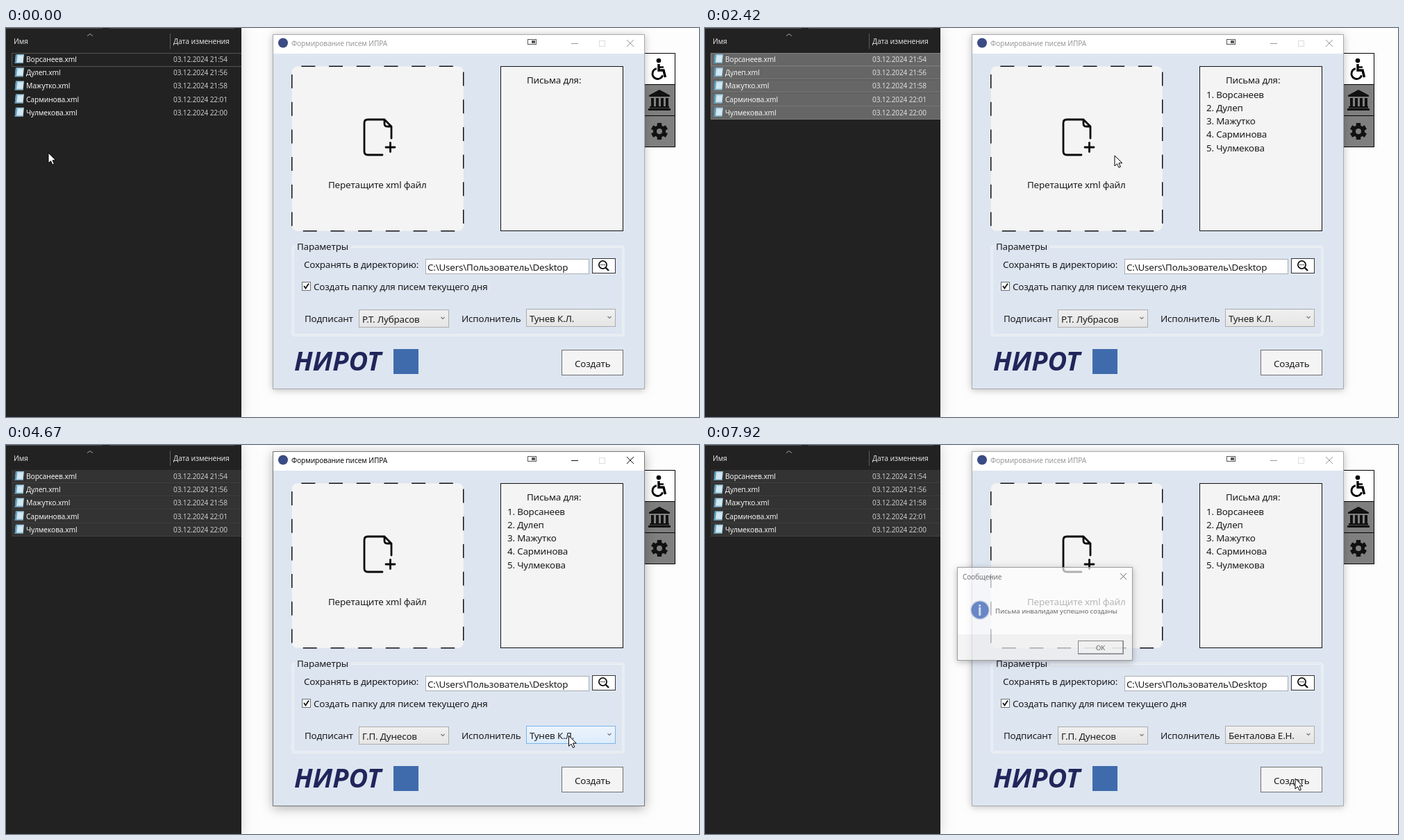
An HTML page with a canvas that plays this animation: 998 px wide and 561 px high, repeating every 8 s.

```html
<!DOCTYPE html>
<html lang="ru">
<head>
<meta charset="utf-8">
<style>
html, body { margin: 0; width: 100%; height: 100%; overflow: hidden; background: #fdfdfd; }
canvas { display: block; }
</style>
</head>
<body>
<canvas id="stage" width="998" height="561"></canvas>
<script>
const ctx = document.getElementById('stage').getContext('2d');
const LOOP = 8000;
const UI = '"Noto Sans", "Open Sans", sans-serif';
const PEOPLE = ['Ворсанеев', 'Дулеп', 'Мажутко', 'Сарминова', 'Чулмекова'];
const TIMES = ['21:54', '21:56', '21:58', '22:01', '22:00'];
const SIGNERS = ['Р.Т. Лубрасов', 'Г.П. Дунесов'];
const AUTHORS = ['Тунев К.Л.', 'Бенталова Е.Н.'];

// Moments of the interaction, in ms
const AT = {
  band: 80, bandEnd: 830, drag: 920, drop: 1920, listed: 2170, focus: 3200,
  signerOpen: 3280, signerPick: 4040, signerSet: 4160,
  authorOpen: 4780, authorPick: 5500, authorSet: 5570,
  press: 6830, release: 6990, modal: 7740
};
// Cursor stops: time, x, y
const PATH = [
  [80, 61, 180], [830, 152, 43], [920, 154, 44], [1330, 306, 71], [1670, 560, 168],
  [1920, 590, 184], [2420, 590, 184], [2920, 585, 330], [3200, 574, 420],
  [3330, 574, 421], [3750, 572, 470], [4080, 572, 470], [4700, 812, 419],
  [4920, 814, 424], [5250, 814, 470], [5750, 815, 470], [6330, 850, 481]
];

const clamp = v => Math.max(0, Math.min(1, v));
const within = (t, a, b) => t >= a && t < b;

function cursorAt(t) {
  const i = PATH.findIndex(p => p[0] > t);
  if (i === 0) return PATH[0].slice(1);
  if (i < 0) return PATH[PATH.length - 1].slice(1);
  const [t0, x0, y0] = PATH[i - 1], [t1, x1, y1] = PATH[i];
  const k = (t - t0) / (t1 - t0), e = k * k * (3 - 2 * k);
  return [x0 + (x1 - x0) * e, y0 + (y1 - y0) * e];
}

function fill(x, y, w, h, color) {
  ctx.fillStyle = color;
  ctx.fillRect(x, y, w, h);
}

function frame(x, y, w, h, color, width = 1) {
  ctx.strokeStyle = color;
  ctx.lineWidth = width;
  ctx.strokeRect(x + .5, y + .5, w - 1, h - 1);
}

function box(x, y, w, h, color, border) {
  fill(x, y, w, h, color);
  frame(x, y, w, h, border);
}

function line(points, color, width = 1) {
  ctx.strokeStyle = color;
  ctx.lineWidth = width;
  ctx.beginPath();
  points.forEach(p => ctx.lineTo(...p));
  ctx.stroke();
}

function disc(x, y, r, color) {
  ctx.fillStyle = color;
  ctx.beginPath();
  ctx.arc(x, y, r, 0, 7);
  ctx.fill();
}

function label(str, x, y, color = '#1b1b1b', size = 13.4, style = '') {
  ctx.font = `${style} ${size}px ${UI}`;
  ctx.letterSpacing = style ? '0px' : `${-size * .014}px`;
  ctx.fillStyle = color;
  ctx.fillText(str, x, y);
}

// Casts a shadow only outside the rectangle, so translucent panels stay clean
function shadow(x, y, w, h, blur, alpha, dy) {
  ctx.save();
  ctx.beginPath();
  ctx.rect(0, 0, 998, 561);
  ctx.rect(x, y, w, h);
  ctx.clip('evenodd');
  ctx.shadowColor = `rgba(0,0,0,${alpha})`;
  ctx.shadowBlur = blur;
  ctx.shadowOffsetY = dy;
  fill(x, y, w, h, '#000');
  ctx.restore();
}

function at(x, y, draw) {
  ctx.save();
  ctx.translate(x, y);
  draw();
  ctx.restore();
}

function fileIcon(x, y) {
  at(x, y, () => {
    ctx.transform(1, 0, -.1, 1, 2, 0);
    fill(0, 0, 12, 13, '#a5cfe2');
    fill(3, 2, 8, 9, '#d3e8f1');
    fill(0, 0, 2, 13, '#5897b8');
    fill(0, 12, 12, 1, '#6b95a9');
  });
}

function explorer(t, cx, cy) {
  shadow(0, 0, 339, 561, 16, .16, 0);
  fill(0, 0, 339, 561, '#222');
  fill(0, 0, 139, 1, '#4a4a4a');
  fill(149, 0, 180, 1, '#4a4a4a');
  fill(236, 8, 1, 22, '#5c5c5c');
  line([[117, 11.5], [121, 8.5], [125, 11.5]], '#a8a8a8');
  label('Имя', 11, 23, '#dedede', 10.2);
  label('Дата изменения', 241, 23, '#dedede', 10.3);

  const active = t < AT.focus;
  PEOPLE.forEach((name, i) => {
    const y = 36 + i * 19.2;
    const selected = t >= AT.bandEnd || (t > AT.band && cy < y + 19);
    if (selected) {
      fill(8, y, 331, 19.2, active ? '#666' : '#333');
      fill(8, Math.round(y + 18), 331, 1, active ? '#7b7b7b' : '#404040');
    }
    if (!i && (!selected || active)) {
      line([[339, 36.5], [8.5, 36.5], [8.5, 55.5], [339, 55.5]], selected ? '#858585' : '#555');
    }
    fileIcon(12, y + 2);
    label(name + '.xml', 29, y + 13, '#f2f2f2', 10.3);
    label('03.12.2024 ' + TIMES[i], 241, y + 13, active && selected ? '#ddd' : '#c9c9c9', 10.1);
  });

  if (within(t, AT.band, AT.bandEnd)) {
    const [, x, y] = PATH[0];
    fill(x, y, cx - x, cy - y, 'rgba(0,120,215,.3)');
    ctx.strokeStyle = '#0078d7';
    ctx.lineWidth = 1;
    ctx.strokeRect(x, y, cx - x, cy - y);
  }
}

function tabs() {
  ['#fff', '#7f7f7f', '#7f7f7f'].forEach((c, i) => box(919, 36 + i * 45, 45, 46, c, '#000'));
  // Wheelchair
  disc(940, 47, 3.3, '#000');
  line([[940, 52], [940, 61], [947, 61], [949.5, 71]], '#000', 3.4);
  line([[940, 56.5], [947, 56.5]], '#000', 2.4);
  ctx.lineWidth = 2.8;
  ctx.beginPath();
  ctx.arc(938.5, 66, 7.5, .3, 4.5);
  ctx.stroke();
  // Building with columns
  ctx.fillStyle = '#111';
  ctx.beginPath();
  [[926, 97], [941, 89], [956, 97], [956, 99], [926, 99]].forEach(p => ctx.lineTo(...p));
  ctx.fill();
  [929, 936, 943, 950].forEach(x => fill(x, 101, 4, 12, '#111'));
  fill(927, 113, 28, 2.5, '#111');
  fill(925, 116, 32, 3, '#111');
  // Gear
  at(941, 149, () => {
    for (let i = 0; i < 6; i++) {
      ctx.rotate(Math.PI / 3);
      fill(-3.2, -12, 6.4, 8, '#111');
    }
    disc(0, 0, 9, '#111');
    disc(0, 0, 4, '#7f7f7f');
  });
}

function titleBar(active) {
  const ink = active ? '#111' : '#999';
  fill(384, 9, 536, 28, '#fff');
  disc(399, 21.5, 7, '#3b4b83');
  label('Формирование писем ИПРА', 411, 26, ink, 10.2);
  frame(751, 16, 13, 8, '#555');
  fill(757, 18, 5, 4, '#555');
  line([[814, 22.5], [824, 22.5]], ink);
  frame(854, 18, 9, 9, '#ddd');
  line([[894, 17], [904, 27]], ink);
  line([[904, 17], [894, 27]], ink);
}

function dropZone() {
  ctx.fillStyle = '#f4f4f4';
  ctx.strokeStyle = '#111';
  ctx.lineWidth = 1.5;
  ctx.beginPath();
  ctx.roundRect(411.75, 55.25, 247, 237.5, 8);
  ctx.fill();
  ctx.setLineDash([20, 19.7]);
  ctx.lineDashOffset = -5.6;
  ctx.stroke();
  ctx.setLineDash([]);

  ctx.lineCap = ctx.lineJoin = 'round';
  ctx.lineWidth = 2.8;
  ctx.strokeStyle = '#0a0a0a';
  ctx.stroke(new Path2D('M542 183H521Q516 183 516 178V137Q516 132 521 132H545L555 142V159M545 132V138Q545 142 549 142H555'));
  line([[547, 172], [560, 172]], '#0a0a0a', 2.8);
  line([[553.5, 165.5], [553.5, 178.5]], '#0a0a0a', 2.8);
  ctx.lineCap = 'butt';
  ctx.lineJoin = 'miter';
  label('Перетащите xml файл', 464, 231);
}

function recipients(t) {
  box(712, 55, 177, 238, '#f4f4f4', '#111');
  label('Письма для:', 750, 80);
  if (t >= AT.listed) PEOPLE.forEach((name, i) => label(`${i + 1}. ${name}`, 722, 100.5 + i * 19.3));
}

function combo(x, y, w, h, value, hot) {
  const shade = ctx.createLinearGradient(0, y, 0, y + h);
  shade.addColorStop(0, hot ? '#ecf4fc' : '#f0f0f0');
  shade.addColorStop(1, hot ? '#dcecfc' : '#e5e5e5');
  box(x, y, w, h, shade, hot ? '#7eb4ea' : '#acacac');
  label(value, x + 5, y + 19);
  line([[x + w - 11.5, y + 11], [x + w - 9, y + 13.5], [x + w - 6.5, y + 11]], '#777', 1.2);
}

function dropdown(x, y, w, items, cy) {
  shadow(x, y, w, 49, 5, .45, 2);
  box(x, y, w, 49, '#fff', '#777');
  items.forEach((item, i) => {
    const top = y + 1 + i * 23.5;
    if (cy >= top && cy < top + 24) box(x + 1, Math.round(top), w - 2, 24, '#b4e0f3', '#26a0da');
    label(item, x + 5, top + 17);
  });
}

function settings(t, cx, cy) {
  ctx.lineWidth = 3;
  ctx.strokeStyle = '#f7f9fc';
  ctx.beginPath();
  ctx.roundRect(413, 315.5, 476, 127.5, 3);
  ctx.stroke();
  ctx.lineWidth = 1;
  ctx.strokeStyle = '#d5dfe5';
  ctx.stroke();
  fill(417, 307, 80, 14, '#dde5f1');
  label('Параметры', 419, 319.5);

  label('Сохранять в директорию:', 429, 346);
  box(604, 333, 236, 22, '#fff', '#abadb3');
  label('C:\\Users\\Пользователь\\Desktop', 607, 350);
  box(844, 332, 34, 22, '#fff', '#333');
  ctx.lineWidth = 1.8;
  ctx.strokeStyle = '#111';
  ctx.beginPath();
  ctx.arc(859.5, 341.5, 5.6, 0, 7);
  ctx.stroke();
  line([[863.5, 345.5], [868, 350]], '#111', 2.4);
  [857, 859.5, 862].forEach(x => disc(x, 341.5, .8, '#111'));

  box(426, 366, 13, 13, '#fff', '#707070');
  line([[429, 372], [431.5, 375.5], [436, 368.5]], '#111', 1.8);
  label('Создать папку для писем текущего дня', 443, 378);

  const over = (x, y, w, h) => within(t, AT.focus - 200, AT.modal) &&
    cx > x && cx < x + w && cy > y && cy < y + h;
  label('Подписант', 430, 424);
  combo(508, 406, 130, 26, SIGNERS[+(t >= AT.signerSet)], over(508, 406, 130, 26));
  label('Исполнитель', 656, 424);
  combo(749, 405, 129, 26, AUTHORS[+(t >= AT.authorSet)], over(749, 405, 129, 26));
}

function createButton(t, cx, cy) {
  const over = cx > 800 && cx < 889 && cy > 464 && cy < 501;
  let colors = ['#f4f4f4', '#707070'];
  if (over && within(t, 5700, AT.modal)) colors = ['#bee6fd', '#3c7fb1'];
  if (within(t, AT.press, AT.release)) colors = ['#c4e5f6', '#2c628b'];
  box(800, 464, 89, 37, ...colors);
  label('Создать', 819, 489);
}

function appWindow(t, cx, cy) {
  const active = within(t, AT.focus, AT.modal);
  shadow(384, 9, 536, 512, active ? 15 : 10, active ? .3 : .25, active ? 3 : 1);
  fill(384, 9, 536, 512, '#dde5f1');
  titleBar(active);
  dropZone();
  recipients(t);
  settings(t, cx, cy);
  label('НИРОТ', 415, 494, '#20265a', 38, 'italic bold');
  fill(558, 463, 36, 36, '#3f6bad');
  createButton(t, cx, cy);
  frame(384, 9, 536, 512, active ? '#777' : '#aaa');
  if (within(t, AT.signerOpen, AT.signerPick)) dropdown(509, 432, 128, SIGNERS, cy);
  if (within(t, AT.authorOpen, AT.authorPick)) dropdown(750, 430, 127, AUTHORS, cy);
}

function messageBox(alpha) {
  ctx.save();
  ctx.globalAlpha = alpha;
  shadow(363, 176, 253, 135, 9, .4, 2);
  fill(363, 176, 253, 97, '#fff');
  fill(363, 273, 253, 38, '#f0f0f0');
  frame(363, 176, 253, 135, '#777');
  label('Сообщение', 371, 194, '#333', 10);
  line([[598, 185], [607, 194]], '#333');
  line([[607, 185], [598, 194]], '#333');
  disc(396, 238, 14, '#c3cbd9');
  disc(396, 238, 12.5, '#3560b8');
  label('i', 392.5, 246, '#fff', 21, 'bold');
  label('Письма инвалидам успешно созданы', 418, 243, '#222', 9.5, '500');
  box(537, 282, 66, 20, '#f0f0f0', '#555');
  line([[538, 300.5], [601.5, 300.5], [601.5, 283]], '#888');
  label('OK', 563, 296, '#222', 9.5);
  ctx.restore();
}

function dragImage(cx, cy) {
  fill(cx - 78, cy - 88, 93, 93, 'rgba(112,142,162,.55)');
  box(cx - 40, cy - 49, 15, 14, '#0b63c4', '#e8f0f8');
  label('5', cx - 35.3, cy - 38, '#fff', 10, 'bold');
}

function cursor(x, y) {
  at(x, y, () => {
    const arrow = new Path2D('M0 0V15L3.5 11.8L6 17.2L8.4 16.1L6 10.8H10.8Z');
    ctx.fillStyle = '#fff';
    ctx.strokeStyle = '#000';
    ctx.lineWidth = 1;
    ctx.fill(arrow);
    ctx.stroke(arrow);
  });
}

function draw(t) {
  const [cx, cy] = cursorAt(t);
  fill(0, 0, 998, 561, '#fdfdfd');
  explorer(t, cx, cy);
  tabs();
  appWindow(t, cx, cy);
  if (t > AT.modal) messageBox(.68 * clamp((t - AT.modal) / 170));
  if (within(t, AT.drag, AT.drop)) dragImage(cx, cy);
  cursor(cx, cy);
}

const start = performance.now();
function tick() {
  draw((performance.now() - start) % LOOP);
  requestAnimationFrame(tick);
}
tick();
</script>
</body>
</html>
```
